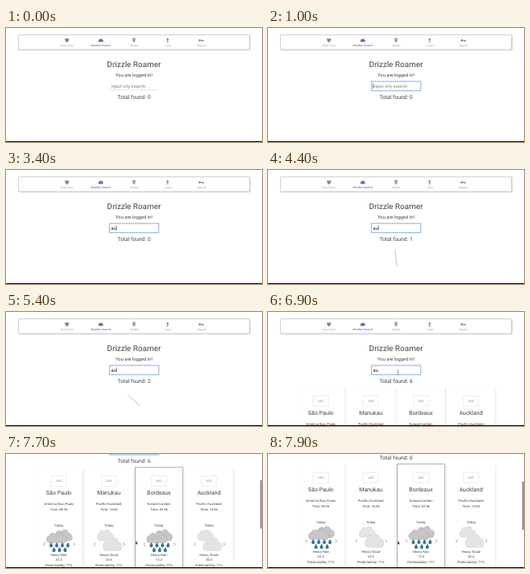
These frames come from a looping animation (320 px wide and 143 px high, 8 s). An HTML page:

```html
<!DOCTYPE html>
<html lang="en">
<head>
<meta charset="utf-8">
<title>Drizzle Roamer</title>
<style>
html, body { margin: 0; width: 100%; height: 100%; overflow: hidden; background: #fff; }
svg { display: block; width: 100%; height: 100%; }
text { font-family: Roboto, Arial, sans-serif; text-anchor: middle; fill: #444; text-rendering: geometricPrecision; }
.left { text-anchor: start; }
</style>
</head>
<body>
<svg viewBox="0 0 320 143">
  <defs>
    <filter id="shadow" x="-10%" y="-30%" width="120%" height="160%">
      <feDropShadow dx=".5" dy=".6" stdDeviation=".7" flood-opacity=".25"/>
    </filter>
    <filter id="soft" x="-10%" y="-10%" width="120%" height="120%">
      <feDropShadow dx=".8" dy="1" stdDeviation="1.2" flood-opacity=".13"/>
    </filter>
    <path id="cloud" d="M5 15a5 5 0 0 1 -.5-9.8A6 6 0 0 1 14 2.6A6.5 6.5 0 0 1 25.5 5A5 5 0 0 1 27 15z"/>
    <path id="drop" d="M1.5 0C.4 2 -.7 3 -.7 4.3a2 2 0 0 0 4.2 0C3.5 3 2.6 2 1.5 0z" fill="#3f7690"/>
    <g id="rain" fill="#c6c6c6" stroke="#a2a2a2" stroke-width=".5">
      <use href="#cloud" transform="translate(9 0) scale(.76 .95)"/>
      <use href="#cloud" transform="translate(0 3.5) scale(.84 .87)"/>
      <g id="drops" stroke="none"></g>
    </g>
    <g id="overcast" fill="#e4e4e4" stroke="#cfcfcf" stroke-width=".5">
      <use href="#cloud" transform="translate(1 0) scale(.66 .93)"/>
      <use href="#cloud" transform="translate(8 10) scale(.77 1.1)"/>
    </g>
  </defs>
  <g id="page">
    <rect x="15.8" y="8.8" width="288.8" height="18.2" fill="#fff" stroke="#b4b4b4" stroke-width=".6" filter="url(#shadow)"/>
    <g fill="#858585">
      <path d="M76.2 18.3C73 16 73 13 74.8 13q1 0 1.4 1q.4-1 1.4-1C79.4 13 79.4 16 76.2 18.3z"/>
      <use href="#cloud" transform="translate(115.3 13.3) scale(.2 .28)" fill="#6f68b4"/>
      <path fill-rule="evenodd" d="M160 18.6C157 14.5 158 12.6 160 12.6S163 14.5 160 18.6zM159.2 14.6a.8.8 0 1 0 1.6 0a.8.8 0 1 0 -1.6 0z"/>
      <path d="M202 12.6l1.9 2.2h-1.3v3.8h-1.2v-3.8h-1.3z"/>
      <path d="M240.4 15.5l2.6-2v1.4h4v2.3h-1.3v-1.1H243v1.4z"/>
    </g>
    <g id="nav"></g>
    <text x="160" y="48.7" font-size="10">Drizzle Roamer</text>
    <text x="160" y="61" font-size="5.8">You are logged in!</text>
    <path id="underline" d="M129 77.7H188" stroke="#d4d4d4" stroke-width=".6"/>
    <rect id="focus" x="129.3" y="67" width="61.6" height="11.7" fill="#fff" stroke="#86addc" stroke-width="1"/>
    <text id="query" class="left" x="131.3" y="74.8" font-size="5.9"></text>
    <path id="caret" stroke="#222" stroke-width=".6"/>
    <text id="total" x="160" y="88.6" font-size="6.8"></text>
    <path id="spinner" d="M-10.5 0H10.5" stroke="#a6aad4" stroke-width=".7"/>
    <g id="cards"></g>
  </g>
  <rect id="bar" x="317.9" width="1.7" height="61" rx=".8" fill="#777"/>
  <path id="beam" d="M-1-3q1 0 1 1V2q0 1-1 1M1-3q-1 0-1 1V2q0 1 1 1" fill="none" stroke="#777" stroke-width=".5"/>
  <path id="arrow" d="M0 0V4.4L1 3.5L1.8 5.1L2.5 4.8L1.8 3.2H3z" fill="#222" stroke="#fff" stroke-width=".3"/>
  <rect y="142" width="320" height="1"/>
</svg>
<script>
const $ = id => document.getElementById(id);
const show = (id, on) => $(id).setAttribute('display', on ? 'inline' : 'none');
const move = (id, x, y, angle = 0) => $(id).setAttribute('transform', `translate(${x} ${y}) rotate(${angle})`);
const label = (x, y, size, text, fill = '#444') =>
  `<text x="${x}" y="${y}" font-size="${size}" style="fill:${fill}">${text}</text>`;

$('nav').innerHTML = ['Heart Faves', 'Weather Search', 'Models', 'Login', 'Register']
  .map((s, i) => label(76.2 + i * 42.1, 23.4, i === 1 ? 3.6 : 3.2, s, i === 1 ? '#5f5a80' : '#999')).join('');

$('drops').innerHTML = Array.from({ length: 7 }, (_, i) =>
  `<use href="#drop" x="${i < 4 ? 5 + i * 7 : 8.5 + (i - 4) * 7}" y="${i < 4 ? 16 : 22}"/>`).join('');

const cities = [
  ['São Paulo', 'America/Sao_Paulo', '00:56', 'Rain', 23.4, 77],
  ['Manukau', 'Pacific/Auckland', '16:56', 'Cloud', 23.6, 71],
  ['Bordeaux', 'Europe/London', '03:56', 'Rain', 12.3, 77],
  ['Auckland', 'Pacific/Auckland', '16:56', 'Cloud', 20.6, 71]
];
$('cards').innerHTML = cities.map(([city, zone, time, sky, temp, chance], i) => {
  const x = 66 + i * 62.6;
  return `<rect class="card" x="${x - 29.7}" y="94.5" width="59.4" height="150" fill="#fff" stroke-width=".8" filter="url(#soft)"/>
    <rect x="${x - 9.5}" y="105" width="19" height="13" fill="#fff" stroke="#d8c8cb" stroke-width=".6" stroke-dasharray="1 .6"/>
    ${label(x, 112.9, 3.6, 'ADD', '#b5727c')}
    ${label(x, 128.6, 7.1, city)}
    ${label(x, 141.6, 4.2, zone)}
    ${label(x, 148.6, 4.2, 'Time: ' + time)}
    ${label(x, 168.4, 4.2, 'Today')}
    <use href="#${sky === 'Rain' ? 'rain' : 'overcast'}" x="${x - 16}" y="172.5"/>
    <path d="M${x - 17} 189l-2 2l2 2M${x + 18} 189l2 2l-2 2" fill="none" stroke="#777" stroke-width=".7"/>
    ${label(x, 205.6, 4.2, 'Heavy ' + sky)}
    ${label(x, 212.1, 4.2, temp)}
    ${label(x, 219, 4.2, `Predictability: ${chance}%`)}`;
}).join('');
const hovered = document.querySelectorAll('.card')[2];

// [start time, count] steps of the result counter
const counts = [[0, 0], [4300, 1], [5200, 2], [5600, 3], [5900, 4], [6100, 6]];
const clamp = v => Math.min(1, Math.max(0, v));

function draw(now) {
  const t = Math.floor(now % 8000 / 100) * 100;
  const focused = t >= 1000;
  const typed = t < 1600 ? '' : t < 1800 ? 'a' : 'au';
  const scroll = 82 * (1 - (1 - clamp((t - 6950) / 1000)) ** 2.13);

  move('page', 0, -scroll);
  show('underline', !focused);
  show('focus', focused);
  $('query').textContent = typed || 'input city search';
  $('query').style.fill = typed ? '#222' : '#858585';
  $('caret').setAttribute('d', `M${131.4 + typed.length * 3.35} 69.5v6.2`);
  show('caret', focused && t < 6100 && (t < 2200 || t % 1000 < 500));
  $('total').textContent = 'Total found: ' + counts.filter(c => c[0] <= t).pop()[1];

  show('spinner', t >= 3500 && t < 6100);
  move('spinner', 160, 111, 84 + (t - 4400) * .138);
  show('cards', t >= 6100);
  hovered.setAttribute('stroke', t >= 7200 ? '#999' : 'none');

  show('bar', t >= 7000);
  $('bar').setAttribute('y', scroll * .42);
  show('beam', t >= 6500 && t < 7000);
  move('beam', 162.5, 75.5);
  show('arrow', t >= 7000);
  move('arrow', 162, 76 + 33 * clamp((t - 6900) / 400));
  requestAnimationFrame(draw);
}
draw(performance.now());
</script>
</body>
</html>
```
